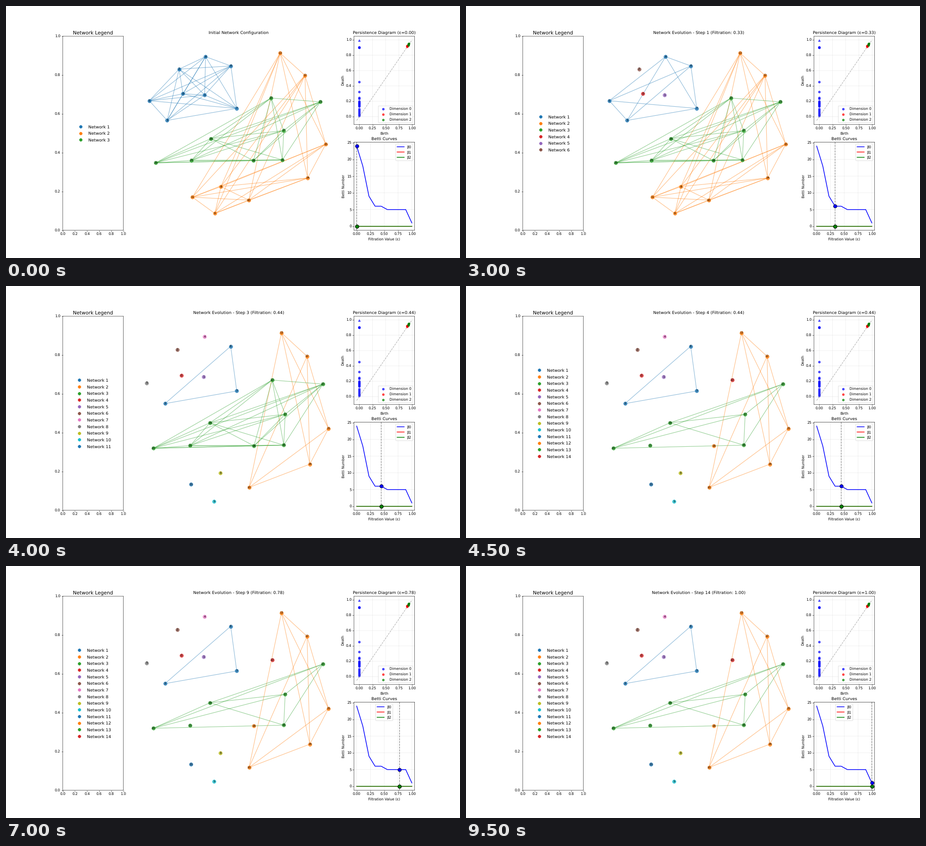
A matplotlib script for the animation above (10 s loop, 1004 px wide and 558 px high).

```python
from itertools import combinations

import matplotlib.pyplot as plt
import numpy as np
from matplotlib.animation import FuncAnimation
from matplotlib.collections import LineCollection

# Keep strokes and glyphs at their exact sub-pixel places
plt.rcParams.update({"font.family": "DejaVu Sans", "text.hinting": "none",
                     "path.snap": False})

WIDTH, HEIGHT = 1004, 558
DPI = WIDTH / 18
FRAMES, INTERVAL = 20, 500
INTRO_FRAMES = 6  # each of the three opening states lasts two frames
COLORS = plt.get_cmap("tab10").colors

# Key points: one row of eight nodes per network, y pointing down
NODES = np.array([
    [(391, 194), (439, 197), (382.5, 139.5), (356, 253),
     (441, 112), (316.5, 209.5), (497, 132.5), (510, 226.5)],
    [(475, 399.5), (461.5, 459), (536.5, 429.5), (412, 423),
     (661, 153.5), (606, 104), (667, 380.5), (707, 305.5)],
    [(611, 340.5), (614, 275.5), (547, 342), (452.5, 293.5),
     (331, 347), (410, 341.5), (586, 203.5), (695, 212)],
]).reshape(-1, 2)

# Nodes that leave their network at each step
SPLITS = {1: (0, 1, 2), 2: (4, 5), 3: (8, 9, 11), 4: (18, 21, 22)}

# Components merge in bursts; the Betti curve counts those still apart
DEATHS = np.concatenate([
    np.linspace(0.01, 0.10, 6),
    np.linspace(0.135, 0.20, 9),
    0.235 + 0.09 * np.linspace(0, 1, 3) ** 3,
    [0.45],
    np.linspace(0.898, 0.903, 4),
])
LOOPS = np.linspace((0.905, 0.912), (0.91, 0.926), 5)
VOIDS = np.linspace((0.927, 0.928), (0.935, 0.95), 5)
TOP = 0.994

EPS = np.linspace(0, 1, 10)
BETTI0 = [1 + np.sum(DEATHS > e) for e in EPS]

# The small offset keeps the pixel size from rounding down
fig = plt.figure(figsize=((WIDTH + 1e-3) / DPI, (HEIGHT + 1e-3) / DPI), dpi=DPI)
grid = fig.add_gridspec(2, 5)
legend_ax = fig.add_subplot(grid[:, 0])
net_ax = fig.add_subplot(grid[:, 1:4])
pers_ax = fig.add_subplot(grid[0, 4])
betti_ax = fig.add_subplot(grid[1, 4])


def networks_at(step):
    """Three base networks, followed by the nodes split off so far."""
    loose = [n for s, group in SPLITS.items() if s <= step for n in group]
    base = [[n for n in range(k, k + 8) if n not in loose] for k in (0, 8, 16)]
    return base + [[n] for n in loose]


def draw_legend(count):
    ax = legend_ax
    ax.clear()
    ax.set(xlim=(0, 1), ylim=(0, 1))
    ax.set_title("Network Legend", fontsize=14)
    em = 12 * DPI / 72
    w, h = ax.bbox.width, ax.bbox.height
    left = -em * (7.93 if count < 10 else 8.57) / 2
    for i in range(count):
        y = 0.5 + ((count - 1) / 2 - i) * 1.578 * em / h
        ax.plot(0.5 + (left + em) / w, y, "o", ms=10, mec="w",
                color=COLORS[i % 10])
        ax.text(0.5 + (left + 2.8 * em) / w, y - 0.365 * em / h,
                f"Network {i + 1}", fontsize=12, va="baseline")


def draw_networks(groups, title):
    ax = net_ax
    ax.clear()
    ax.axis("off")
    ax.set_title(title, fontsize=12)
    low, high = [], []
    for i, group in enumerate(groups):
        pts = NODES[group]
        color = COLORS[i % 10]
        pad = 0.05 * np.ptp(pts, axis=0)
        low.append(pts.min(axis=0) - pad)
        high.append(pts.max(axis=0) + pad)
        ax.add_collection(LineCollection(list(combinations(pts, 2)), colors=[color],
                                         linewidths=1.5, alpha=0.5, zorder=1))
        ax.scatter(*pts.T, s=100, color=[color], alpha=0.8, zorder=2)
        for n, (x, y) in zip(group, pts):
            ax.text(x, y, str(n), fontsize=8, ha="center", va="center", zorder=3)
    low, high = np.min(low, axis=0), np.max(high, axis=0)
    margin = 0.05 * (high - low)
    (x0, y0), (x1, y1) = low - margin, high + margin
    ax.set(xlim=(x0, x1), ylim=(y1, y0))


def draw_persistence(eps):
    ax = pers_ax
    ax.clear()
    ax.plot([-0.05, TOP], [-0.05, TOP], "k--", alpha=0.3)
    ax.scatter(0 * DEATHS, DEATHS, color="blue", alpha=0.7, label="Dimension 0")
    ax.scatter([0], [TOP], marker="^", color="blue", alpha=0.7)
    ax.scatter(*LOOPS.T, color="red", alpha=0.7, label="Dimension 1")
    ax.scatter(*VOIDS.T, color="green", alpha=0.7, label="Dimension 2")
    ax.set(xlim=(-0.102, 1.047), ylim=(-0.102, 1.047),
           xlabel="Birth", ylabel="Death")
    ax.set_title(f"Persistence Diagram (ε={eps:.2f})", fontsize=12)
    ax.grid(alpha=0.3)
    ax.legend(loc="lower right")


def draw_betti(level):
    ax = betti_ax
    ax.clear()
    eps = EPS[level]
    flat = np.zeros(len(EPS))
    for i, (color, values) in enumerate(
            [("blue", BETTI0), ("red", flat), ("green", flat)]):
        ax.plot(EPS, values, color=color, lw=2, label=f"β{i}")
        ax.scatter([eps], [values[level]], s=100, color=color,
                   edgecolor="black", zorder=5)
    ax.axvline(eps, color="black", ls="--", alpha=0.5)
    ax.set(xlim=(-0.05, 1.05), ylim=(-1.2, 25.2),
           xlabel="Filtration Value (ε)", ylabel="Betti Number")
    ax.set_title("Betti Curves", fontsize=12)
    ax.grid(alpha=0.3)
    # The legend moves aside once the cursor would run through it
    ax.legend(loc="upper right" if level < 7 else "upper center")


def update(frame):
    if frame < INTRO_FRAMES:
        step, level = 0, frame // 2
        title = "Initial Network Configuration"
    else:
        step = frame - INTRO_FRAMES + 1
        level = (step + 5) // 2
        title = f"Network Evolution - Step {step} (Filtration: {EPS[level]:.2f})"
    groups = networks_at(step)
    draw_legend(len(groups))
    draw_networks(groups, title)
    draw_persistence(EPS[level])
    draw_betti(level)
    return []


anim = FuncAnimation(fig, update, frames=FRAMES, interval=INTERVAL,
                     init_func=lambda: update(0), repeat=True, repeat_delay=0)
plt.show()
```
